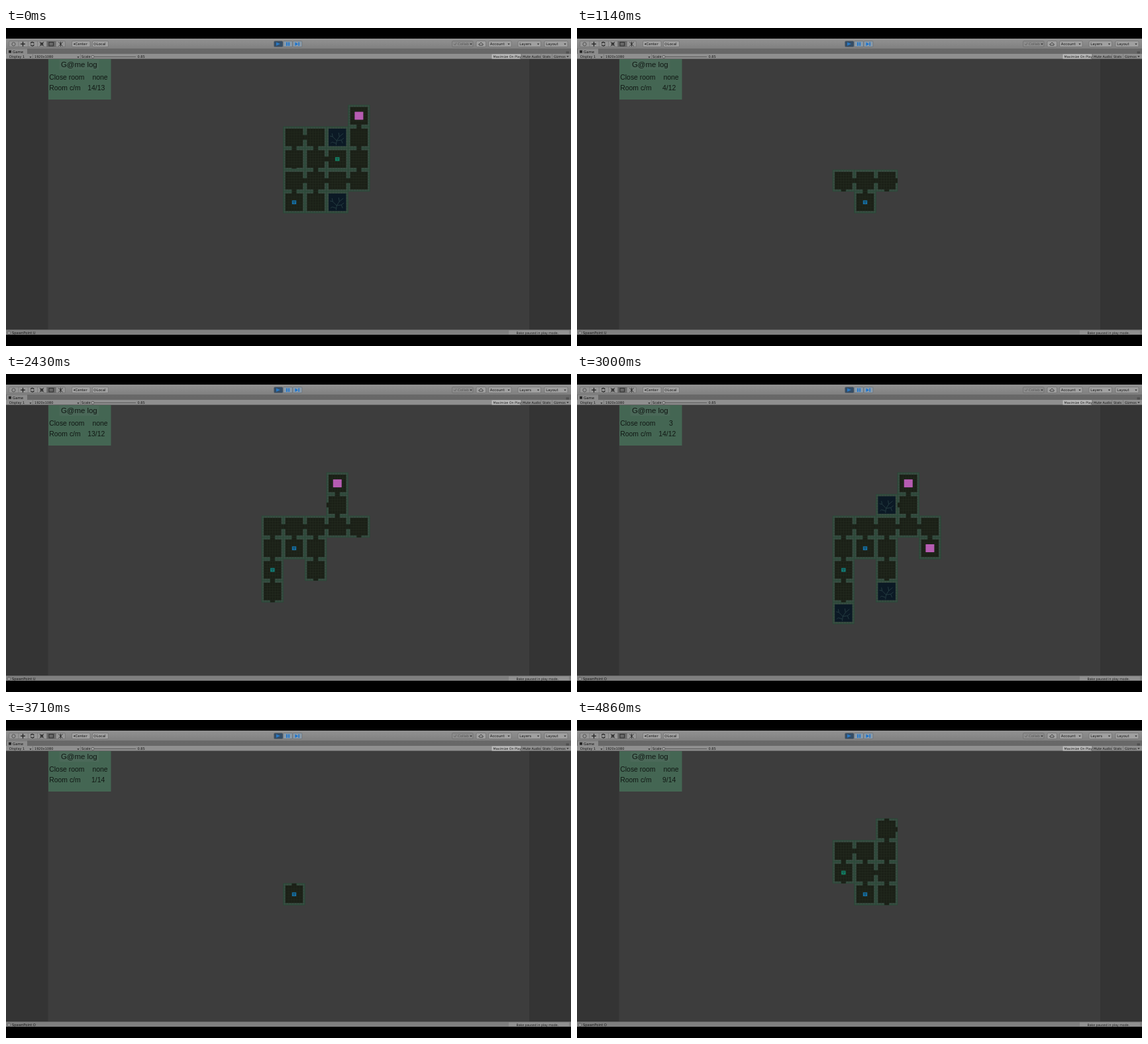
An HTML page with a canvas that plays this animation: 853x480 px, repeating every 5.01 s.

```html
<!DOCTYPE html>
<html lang="en">
<head>
<meta charset="utf-8">
<title>Room generator</title>
<style>
html, body { margin: 0; width: 100%; height: 100%; overflow: hidden; background: #000; }
canvas { display: block; }
</style>
</head>
<body>
<canvas id="stage" width="853" height="480"></canvas>
<script>
const ctx = document.getElementById('stage').getContext('2d');
const LOOP = 5010, LAST_STEP = 34;
const PITCH = 32.63, FLOOR = 26.4, HALF = PITCH / 2;

// Each room: column, row (relative to the start), open doors, optional content.
// Content: b/g = blue/green/teal chest, p = pink exit, x = closed room.
const parseMap = text => text.split(';').map(entry => {
  const [col, row, doors, kind] = entry.trim().split(' ');
  return { x: 435 + col * PITCH, y: 263 + row * PITCH, doors, kind };
});
const maps = [
  `0 0 U b;0 -1 DR;1 -1 LRUD;2 -1 LR;3 -1 LU;1 0 U;0 -2 Us;1 -2 DUR;2 -2 L g;3 -2 UD;
   0 -3 RD;1 -3 LD;3 -3 UD;3 -4 D p;2 -3 - x;2 0 - x`,
  `0 0 U b;0 -1 DLR;-1 -1 RD;1 -1 LRD;-1 0 UD;2 -1 LUR;1 0 UD;-1 1 UD t;2 -2 DUL;
   3 -1 LD;1 1 UD;-1 2 UD;2 -3 D p;3 0 U p;1 -2 - x;1 2 - x;-1 3 - x`,
  `0 0 U b;0 -1 DUR;0 -2 DL;1 -1 LUD;-1 -2 RD;1 0 UD;1 -2 UD;-1 -1 UD g;1 -3 DUR`
].map(parseMap);

function rect(x, y, w, h, color) {
  ctx.fillStyle = color;
  ctx.fillRect(x, y, w, h);
}

function text(str, x, y, size, color = '#111', align = 'left', family = '"Liberation Sans", Arial') {
  ctx.font = `${size}px ${family}, sans-serif`;
  ctx.textAlign = align;
  ctx.fillStyle = color;
  ctx.fillText(str, x, y);
}

const label = (str, x, y, color = '#151515', size = 5.4) =>
  text(str, x, y, size, color, 'left', '"DejaVu Sans"');

// Polylines given as "x,y x,y | x,y x,y"
function lines(path, color, width = 1, dx = 0, dy = 0) {
  ctx.strokeStyle = color;
  ctx.lineWidth = width;
  ctx.beginPath();
  for (const part of path.split('|'))
    part.trim().split(' ').forEach((p, i) => {
      const [x, y] = p.split(',');
      ctx[i ? 'lineTo' : 'moveTo'](+x + dx, +y + dy);
    });
  ctx.stroke();
}

function triangle(x, y, w, h, color) {
  ctx.fillStyle = color;
  ctx.beginPath();
  ctx.moveTo(x, y);
  ctx.lineTo(x + w, y + h / 2);
  ctx.lineTo(x, y + h);
  ctx.fill();
}

function dropArrow(x, y) {
  ctx.fillStyle = '#222';
  ctx.beginPath();
  ctx.moveTo(x - 1.6, y);
  ctx.lineTo(x + 1.6, y);
  ctx.lineTo(x, y + 2);
  ctx.fill();
}

function button(x, w, color = '#a0a0a0') {
  ctx.fillStyle = color;
  ctx.strokeStyle = '#696969';
  ctx.lineWidth = 0.6;
  ctx.beginPath();
  ctx.roundRect(x, 19.7, w, 8.8, 1.5);
  ctx.fill();
  ctx.stroke();
}

function drawToolbar() {
  const shade = ctx.createLinearGradient(0, 16, 0, 31);
  shade.addColorStop(0, '#929292');
  shade.addColorStop(1, '#808080');
  rect(0, 16, 853, 15, shade);

  button(4.5, 85, '#969696');
  rect(61.5, 20, 13.5, 8.2, '#686868');
  for (let i = 1; i < 6; i++) rect(4.5 + i * 14.2, 20, 0.6, 8.2, '#6d6d6d');
  ctx.strokeStyle = '#4c4c4c';
  ctx.lineWidth = 0.9;
  ctx.beginPath();
  ctx.arc(11.5, 24.3, 2.6, 0, 7);
  ctx.stroke();
  lines('22,24.2 29,24.2|25.5,20.7 25.5,27.7', '#222', 1.3);
  ctx.strokeStyle = '#222';
  ctx.lineWidth = 1.2;
  for (const a of [0.3, 3.44]) {
    ctx.beginPath();
    ctx.arc(39.8, 24.2, 2.7, a, a + 2.5);
    ctx.stroke();
  }
  lines('51,21 57,27.4|57,21 51,27.4', '#222', 0.9);
  ctx.strokeRect(52.3, 22.5, 3.4, 3.4);
  ctx.lineWidth = 0.8;
  ctx.strokeRect(65, 21.5, 6.5, 5.5);
  lines('79.5,21.2 85.5,27.4|85.5,21.2 79.5,27.4|82.5,20.8 82.5,27.8', '#222', 0.9);

  button(99.5, 27.5);
  button(130.5, 24);
  triangle(104, 22.8, -2.2, 3, '#222');
  label('Center', 104.5, 26.2);
  ctx.strokeStyle = '#222';
  ctx.beginPath();
  ctx.arc(134.2, 24.2, 1.6, 0, 7);
  ctx.stroke();
  label('Local', 136.6, 26.2);

  button(404.5, 13.5, '#344d66');
  button(418.5, 14, '#8799a9');
  button(433, 14, '#8799a9');
  triangle(408, 21.4, 6, 5.4, '#2879c6');
  rect(423.2, 21.5, 1.7, 5.4, '#1672cf');
  rect(426.3, 21.5, 1.7, 5.4, '#1672cf');
  triangle(436.5, 21.5, 4.5, 5.4, '#1672cf');
  rect(441.5, 21.5, 1.4, 5.4, '#1672cf');

  button(673.5, 31.5, '#8b8b8b');
  label('Collab', 682, 26.2, '#5a5a5a');
  lines('676,24 678,26 680,22', '#626262', 0.8);
  button(710, 14.5);
  lines('714.5,26 713.8,24.4 715.4,23.5 717,22 718.8,23.3 720.2,24.4 719.8,26 714.5,26', '#222', 0.8);
  [['Account', 728.5, 34.5], ['Layers', 773, 34.5], ['Layout', 813, 35]].forEach(([name, x, w]) => {
    button(x, w);
    label(name, x + 2.3, 26.2);
    dropArrow(x + w - 4, 23.4);
  });
  [[702, '#5a5a5a']].forEach(([x]) => dropArrow(x, 23.4));
}

function drawTabs() {
  rect(0, 31, 853, 8, '#686868');
  rect(1, 31.5, 31, 8, '#8b8b8b');
  rect(4, 33.7, 4, 4, '#252525');
  label('Game', 10, 37.6);
  lines('845.5,36 850,36|845.5,37.8 850,37.8', '#303030', 0.7);

  rect(0, 39, 853, 8, '#8f8f8f');
  rect(0, 46.3, 853, 0.7, '#555');
  label('Display 1', 5, 45, '#151515', 5);
  label('1920x1080', 43, 45, '#151515', 5);
  label('Scale', 114, 45.1, '#151515', 5);
  label('0.85', 198.5, 45.1, '#151515', 5);
  for (const x of [37, 109]) {
    dropArrow(x, 43.2);
    rect(x + 3, 39.5, 0.6, 7, '#696969');
  }
  rect(130, 43, 66, 0.9, '#555');
  ctx.fillStyle = '#aaa';
  ctx.strokeStyle = '#444';
  ctx.lineWidth = 0.7;
  ctx.beginPath();
  ctx.arc(131, 43.4, 2, 0, 7);
  ctx.fill();
  ctx.stroke();
  rect(733.5, 39.5, 43.5, 7, '#b9b9b9');
  [['Maximize On Play', 735.5], ['Mute Audio', 780], ['Stats', 810], ['Gizmos', 827]]
    .forEach(([name, x]) => label(name, x, 45, '#101010', 4.8));
  for (const x of [778, 807.5, 824]) rect(x, 39.5, 0.6, 7, '#696969');
  dropArrow(848, 42.3);
}

function drawStatus(point) {
  rect(0, 455, 853, 8, '#7f7f7f');
  rect(0, 455, 853, 0.8, '#5a5a5a');
  ctx.fillStyle = '#d0d0d0';
  ctx.strokeStyle = '#333';
  ctx.lineWidth = 0.7;
  ctx.beginPath();
  ctx.arc(4.5, 460, 2.2, 0, 7);
  ctx.fill();
  ctx.stroke();
  rect(4.1, 458.7, 0.8, 2.2, '#222');
  label('SpawnPoint ' + point, 9, 462.2, '#151515', 5.2);
  rect(759, 456.5, 91, 6, '#919191');
  label('Bake paused in play mode.', 770.5, 461.6, '#151515', 4.7);
}

function drawLog(count, closed) {
  rect(64, 47, 94.5, 61, '#446653');
  rect(80.5, 47.5, 60, 15.5, '#4b6959');
  const ink = '#111814';
  text('G@me log', 110.3, 59.3, 11.45, ink, 'center');
  text('Close room', 65.3, 77.6, 10.4, ink);
  text(closed, 142, 77.6, 10.4, ink, 'center');
  text('Room c/m', 65.3, 94, 10.4, ink);
  text(count, 149.3, 94, 10.4, ink, 'right');
}

function drawWalls({ x, y, kind }) {
  rect(x - HALF, y - HALF, PITCH, PITCH, '#394c42');
  for (let i = 0; i <= 8; i++) {
    const d = -HALF + i * PITCH / 8;
    rect(x + d - 0.3, y - HALF, 0.6, PITCH, '#2a4435');
    rect(x - HALF, y + d - 0.3, PITCH, 0.6, '#2a4435');
  }
  ctx.strokeStyle = '#2d4f3d';
  ctx.lineWidth = 0.7;
  ctx.strokeRect(x - HALF + 0.6, y - HALF + 0.6, PITCH - 1.2, PITCH - 1.2);
  if (kind === 'x') {
    const edge = HALF + 1.5;
    lines(`${-edge},-2 ${-HALF},-2|${-edge},2 ${-HALF},2|${edge},-2 ${HALF},-2|${edge},2 ${HALF},2`,
      '#2d4f3d', 0.8, x, y);
  }
}

function drawFloor({ x, y, doors, kind }) {
  const half = FLOOR / 2, floor = '#1b2017', wall = HALF - half + 0.2;
  rect(x - half, y - half, FLOOR, FLOOR, kind === 'x' ? '#0b1925' : floor);
  if (kind === 'x') {
    lines('-2,12 -1,5 -7,-1 -8,-6|-1,5 3,-1 2,-7|3,-1 9,-6|-7,-1 -11,-2|-1,5 6,4 10,1|-2,9 -8,7 -10,9|6,4 8,9',
      '#263f43', 0.9, x, y);
  } else {
    for (let d = -8; d <= 8; d += 4) {
      rect(x + d - 0.25, y - half, 0.5, FLOOR, '#252c20');
      rect(x - half, y + d - 0.25, FLOOR, 0.5, '#252c20');
    }
  }
  if (doors.includes('U')) rect(x - 3.5, y - HALF, 7, wall, floor);
  if (doors.includes('D')) rect(x - 3.5, y + half - 0.2, 7, wall, floor);
  if (doors.includes('L')) rect(x - HALF, y - 3.5, wall, 7, floor);
  if (doors.includes('R')) rect(x + half - 0.2, y - 3.5, wall, 7, floor);
  if (doors.includes('s')) rect(x - 3.5, y + half - 0.2, 7, 1.6, floor);

  if (kind === 'p') rect(x - 6.5, y - 6, 13, 12, '#b65cb2');
  const chest = { b: '#1670a5', g: '#148463', t: '#11817a' }[kind];
  if (chest) {
    rect(x - 3.2, y - 2.8, 6.4, 5.8, chest);
    rect(x - 2, y - 1.3, 4, 0.9, '#123642');
    rect(x - 1, y + 0.7, 2, 0.9, '#123642');
  }
}

function stateAt(step) {
  if (step < 5) return { rooms: maps[0], goal: 13, closed: 'none' };
  if (step < 26) {
    const n = Math.min(step - 4, 17);
    return { rooms: maps[1].slice(0, n), goal: 12, closed: n > 14 ? n - 14 : 'none' };
  }
  return { rooms: maps[2].slice(0, step - 25), goal: 14, closed: 'none' };
}

function draw(step) {
  const { rooms, goal, closed } = stateAt(step);
  rect(0, 0, 853, 480, '#000');
  rect(0, 47, 853, 408, '#343434');
  rect(63.5, 47, 726.5, 408, '#3d3d3d');
  drawToolbar();
  drawTabs();
  drawStatus(step < 18 ? 'U' : 'O');
  drawLog(`${Math.min(rooms.length, 14)}/${goal}`, closed);
  rooms.forEach(drawWalls);
  rooms.forEach(drawFloor);
}

// Seven steps per second, with starts rounded to 10 ms.
let shown = -1;
function tick() {
  const time = performance.now() % LOOP;
  const step = Math.min(LAST_STEP, Math.floor((time + 5) * 7 / 1000));
  if (step !== shown) draw(shown = step);
  requestAnimationFrame(tick);
}
tick();
</script>
</body>
</html>
```
